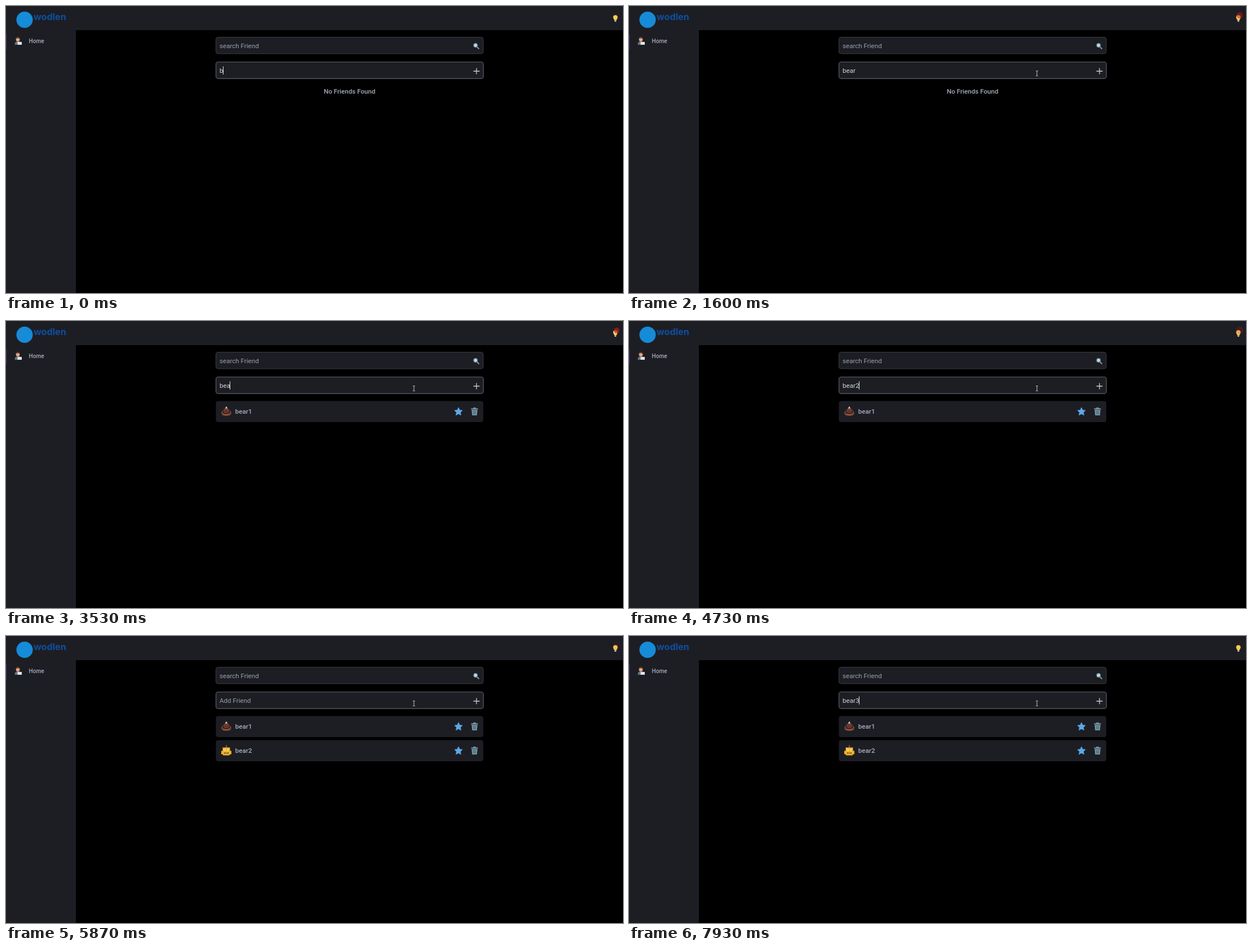
Recreate the animation shown at these times as an HTML page. Size 1095 px wide and 511 px high, loop 8000 ms.

```html
<!DOCTYPE html>
<html lang="en">
<head>
<meta charset="utf-8">
<title>Friend list</title>
<style>
  html, body { margin: 0; width: 100%; height: 100%; overflow: hidden; background: #000; }
  svg { display: block; width: 100%; height: 100%; }
  text { font: 11.6px Roboto, sans-serif; fill: #9ba1ad; white-space: pre; }
  .strong { font-weight: 500; fill: #a6adbb; }
  .brand { font: 700 16.2px Inter, sans-serif; fill: #0d4f9f; }
  .panel { fill: #1d1e24; }
  .field { fill: #1d1e24; stroke: #3a3b44; }
</style>
</head>
<body>
<svg viewBox="0 0 1095 511">
  <defs>
    <g id="actions">
      <path fill="#5aa9e6" stroke="#5aa9e6" stroke-linejoin="round"
        d="M803 -6.8l2.1 4.5 4.9.6-3.6 3.4.9 4.9-4.3-2.4-4.3 2.4.9-4.9-3.6-3.4 4.9-.6z"/>
      <path fill="#7597a8" d="M825.5-5.5h3.3l.8-1.4h3.8l.8 1.4h3.3v2h-12zM826.3-2.8h10.4l-1 9.8h-8.4z"/>
      <path stroke="#46616f" d="M829.3-1.3l.4 6.6M831.5-1.3v6.6M833.7-1.3l-.4 6.6"/>
    </g>
  </defs>

  <path class="panel" d="M0 0H1095V43H124V511H0z"/>
  <path fill="#54278f" d="M0 50h1v27h-1z"/>
  <circle cx="33" cy="24.5" r="14.5" fill="#168bd8"/>
  <text class="brand" x="49" y="25">wodlen</text>

  <!-- person at a laptop -->
  <path fill="#657786" d="M15.5 69q0-6.5 6-6.5t6.5 6.5z"/>
  <circle cx="21" cy="59.5" r="3.4" fill="#e5a783"/>
  <path fill="#5b3526" d="M17.3 59.5q-.5-4.8 3.7-4.8t3.7 4.8q-1.3-2.2-3.7-2.2t-3.7 2.2z"/>
  <path fill="#dfe5e9" d="M20.5 64h7.5v5h-7.5z"/>
  <text class="strong" x="40.5" y="66" style="font-size:10.1px">Home</text>

  <!-- light bulb -->
  <path fill="#ffcf55" d="M1081.5 16.3a4 4 0 0 1 4 4q0 1.9-1.5 3.4l-.6 1.8h-3.8l-.6-1.8q-1.5-1.5-1.5-3.4a4 4 0 0 1 4-4z"/>
  <path fill="#b4bdc4" d="M1079.7 25.4h3.6l-.5 2.5h-2.6z"/>
  <path fill="none" stroke="#fff0b8" d="M1079.7 20q.3-1.6 1.6-1.8"/>
  <circle id="ping" cx="1083.8" cy="16.7" fill="#b5171e"/>

  <rect class="field" x="372.5" y="55.5" width="474.5" height="29.5" rx="4"/>
  <text x="379" y="74.5">search Friend</text>
  <path stroke="#8a949c" stroke-width="2" stroke-linecap="round" d="M836 73l3 3"/>
  <circle cx="833.3" cy="70" r="3.3" fill="#b4dcf2" stroke="#73858f" stroke-width="1.2"/>

  <rect class="field" x="372.6" y="99.6" width="474.6" height="29.6" rx="4" style="stroke:#50515d;stroke-width:1.4"/>
  <text id="entry" x="379" y="119"></text>
  <path id="caret" stroke="#e2e4e8" d="M0 107.5v14.5"/>
  <path stroke="#cdd0d6" stroke-width="1.3" d="M829.5 116h11M835 110.5v11"/>

  <text id="empty" class="strong" x="609.8" y="155.5" text-anchor="middle">No Friends Found</text>

  <g class="row" transform="translate(0 161)">
    <rect class="panel" x="372.5" y="-18.5" width="474.5" height="37.5" rx="4"/>
    <text class="strong" x="406.8" y="4.4">bear1</text>
    <use href="#actions"/>
    <g class="avatar">
      <path fill="#d8d4cf" d="M388.3-4.5l2.7-4.7 2.7 4.7z"/>
      <path fill="#6b4132" d="M385-1q1.5-4.5 6-4.5t6 4.5q3 .6 3 3.4 0 5.6-9 5.6t-9-5.6q0-2.8 3-3.4z"/>
      <path fill="#2d1d1a" d="M385-.5h12v3.4q-6 2-12 0z"/>
      <path fill="none" stroke="#d43c32" stroke-width="1.5" d="M386.7.6q4.3 1.8 8.6 0"/>
      <path fill="none" stroke="#9a6b55" d="M384.5 5q6.5 2.7 13 0"/>
    </g>
  </g>
  <g class="row" transform="translate(0 204)">
    <rect class="panel" x="372.5" y="-18.5" width="474.5" height="37.5" rx="4"/>
    <text class="strong" x="406.8" y="4.4">bear2</text>
    <use href="#actions"/>
    <g class="avatar" fill="#f5b324">
      <path stroke="#d99a1c" d="M391-9.5v4"/>
      <path d="M384.5-5.5h13v6h2.5v6h-2.5l-1 2h-11l-1-2h-2.5v-6h2.5z"/>
      <circle cx="388" cy="-1.2" r="2" fill="#fff3c4"/>
      <circle cx="394" cy="-1.2" r="2" fill="#fff3c4"/>
      <path fill="#634519" d="M387.4-1.8h1.3v1.3h-1.3zM393.4-1.8h1.3v1.3h-1.3zM387 3.3h8v2.4h-8z"/>
      <path stroke="#ffe29a" stroke-width=".8" d="M389 3.3v2.4M391 3.3v2.4M393 3.3v2.4"/>
    </g>
  </g>

  <path id="pointer" fill="none" stroke="#c4c6ca" d="M722 115.5h1.3l.7.7.7-.7h1.3M724 116v8M722 124.5h1.3l.7-.7.7.7h1.3"/>
</svg>
<script>
  const LOOP = 8000, PING_START = 465, BLINK = 500;
  const $ = id => document.getElementById(id);
  const show = (el, on) => el.setAttribute("visibility", on ? "visible" : "hidden");

  // Each key press: time and resulting value
  const keys = [
    [0, "b"], [200, "be"], [520, "bea"], [970, "bear"], [1770, "bear1"], [2070, ""],
    [3070, "b"], [3270, "be"], [3470, "bea"], [3830, "bear"], [4600, "bear2"], [5070, ""],
    [6270, "b"], [6470, "be"], [6730, "bea"], [6970, "bear"], [7730, "bear3"]
  ];
  const added = [2070, 5070], loadTime = 630;
  const rows = [...document.querySelectorAll(".row")];

  function draw(t) {
    const [pressed, value] = keys.findLast(([at]) => at <= t);
    const entry = $("entry");
    entry.textContent = value || "Add Friend";
    entry.style.fill = value ? "#d3d6dc" : "#9ba1ad";
    const x = value ? 379 + entry.getComputedTextLength() : 379;
    $("caret").setAttribute("transform", `translate(${Math.floor(x) + .5})`);
    show($("caret"), (t - pressed) % (2 * BLINK) < BLINK);

    show($("pointer"), t >= 200);
    show($("empty"), t < added[0]);
    rows.forEach((row, i) => {
      row.style.display = t >= added[i] ? "" : "none";
      show(row.querySelector(".avatar"), t >= added[i] + loadTime);
    });

    // Ping grows and fades over three quarters of each second
    const phase = Math.min(1, (t - PING_START + 1000) % 1000 / 750);
    const grow = 1 - (1 - phase) ** 3.2;
    $("ping").setAttribute("r", 3.9 * (1 + grow));
    $("ping").setAttribute("opacity", 1 - grow);
  }

  const start = performance.now();
  function frame() {
    draw((performance.now() - start) % LOOP);
    requestAnimationFrame(frame);
  }
  frame();
</script>
</body>
</html>
```
